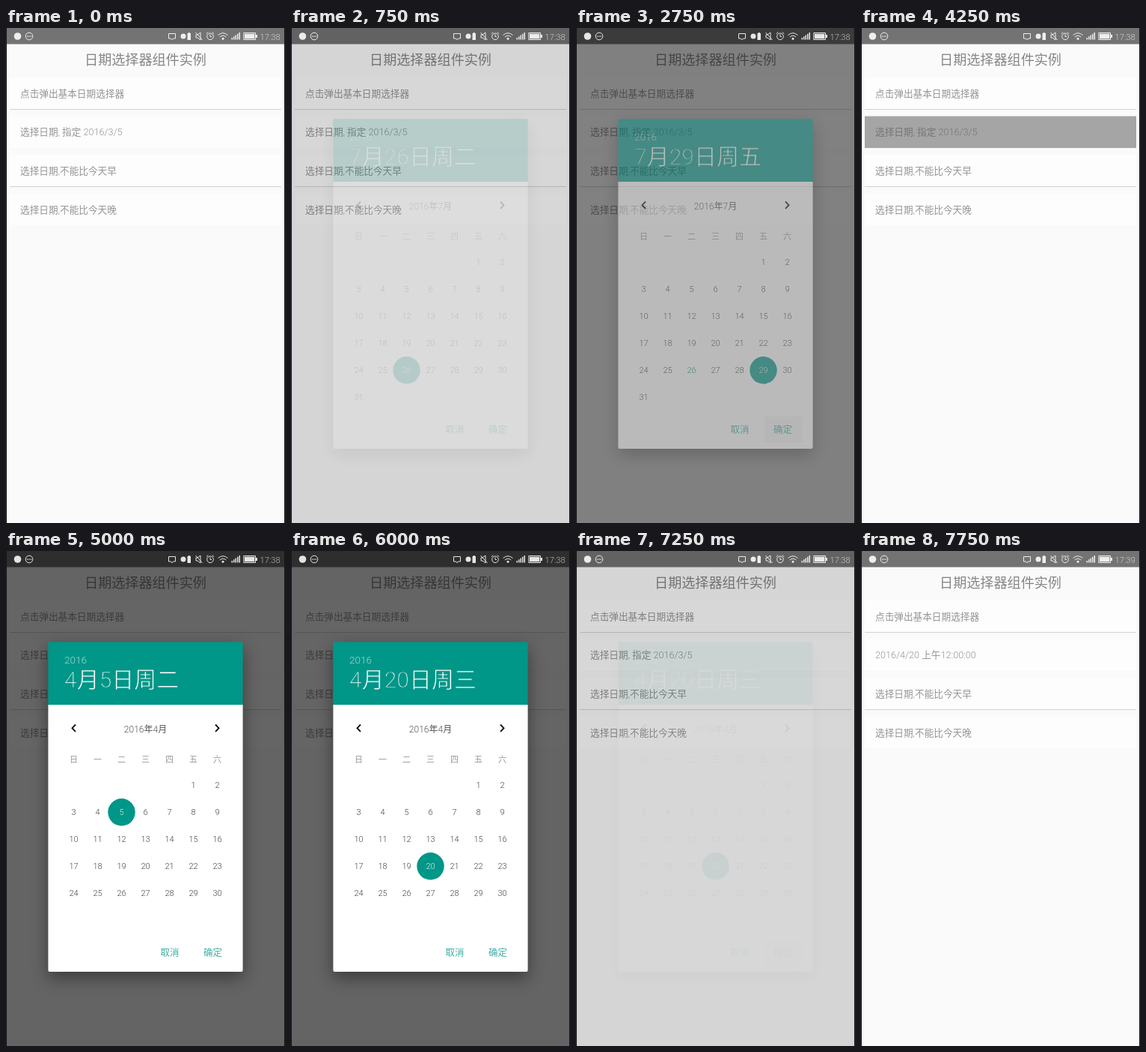
Recreate the animation shown at these times as an HTML page. Size 373 by 660 pixels, loop 8 s.

```html
<!DOCTYPE html>
<html lang="zh-CN">
<head>
<meta charset="utf-8">
<title>日期选择器</title>
<style>
html, body { margin: 0; width: 100%; height: 100%; overflow: hidden; background: #fafafa; }
svg { display: block; width: 373px; height: 660px; }
text { font-family: Roboto, "Noto Sans CJK SC", "Noto Sans CJK", sans-serif; font-weight: 300; }
.mid { text-anchor: middle; }
.line { fill: none; stroke: #fff; stroke-width: 1; }
#card { filter: drop-shadow(0 8px 11px rgba(0, 0, 0, .42)); }
/* An inner edge in the header colour gives hairline strokes. */
#heading { fill: #fff; stroke: #009688; stroke-width: .8; }
</style>
</head>
<body>
<svg id="stage" viewBox="0 0 373 660">
  <defs>
    <linearGradient id="paper" gradientUnits="userSpaceOnUse" x1="0" y1="121" x2="0" y2="561">
      <stop offset=".192" stop-color="#009688"/>
      <stop offset=".192" stop-color="#fff"/>
    </linearGradient>
  </defs>
  <rect width="373" height="660" fill="#fafafa"/>
  <rect width="373" height="21.5" fill="#737373"/>
  <text class="mid" x="186.5" y="48.5" font-size="18.1" fill="#868686">日期选择器组件实例</text>
  <g id="rows" fill="#959595"></g>
  <rect id="dim" width="373" height="660"/>

  <g id="dialog">
    <rect id="card" x="56.4" y="121.3" width="260.2" height="439.7" rx="2" fill="url(#paper)"/>
    <text x="78" y="149.5" font-size="13.6" fill="#fff" fill-opacity=".65">2016</text>
    <text id="heading" x="78" y="182" font-size="30"></text>
    <text id="month" class="mid" x="186.5" y="241.5" font-size="12" fill="#555"></text>
    <path d="M93 231.5l-4.5 4.7 4.5 4.7M280 231.5l4.5 4.7-4.5 4.7" fill="none" stroke="#111" stroke-width="1.9"/>
    <circle id="touch" r="18.2" fill="#e0e0e0"/>
    <circle id="chosen" r="18.2" fill="#009688"/>
    <g id="days" class="mid" font-size="11"></g>
    <rect id="ok" x="252" y="518" width="50" height="35" rx="2" fill-opacity=".03"/>
    <g font-size="12.5" fill="#3fafa4">
      <text x="206.5" y="540">取消</text>
      <text x="264" y="540">确定</text>
    </g>
  </g>

  <g id="status" fill="#fff" opacity=".88">
    <circle cx="15.5" cy="11" r="4.8"/>
    <circle class="line" cx="31" cy="11" r="4.8"/>
    <path d="M28 10.4h1.4v1.3H28zM30.3 10.4h1.4v1.3h-1.4zM32.6 10.4H34v1.3h-1.4z"/>
    <path class="line" d="M217.5 7.5h9v6.5h-3l-1.5 1.8-1.5-1.8h-3z"/>
    <circle cx="237" cy="11" r="3.5"/>
    <path d="M242.5 7h1.2V6h2v1h1.3v9h-4.5z"/>
    <path class="line" d="M254 9h2l4-3v10l-4-3h-2zM253.5 6l9 10"/>
    <circle class="line" cx="273" cy="11.3" r="4.3"/>
    <path class="line" d="M273 8.5v3h2M267.8 7.8l2.5-2.3M278.2 7.8l-2.5-2.3"/>
    <path class="line" d="M283.5 9.5q6.5-5.5 13 0M285.8 12q4.2-3.5 8.4 0"/>
    <circle cx="290" cy="14.3" r="1.5"/>
    <path d="M301.5 13h1.5v2.5h-1.5zM304 11.3h1.5v4.2H304zM306.5 9.5h1.5v6h-1.5zM309 7.7h1.5v7.8H309zM311.5 6h1.5v9.5h-1.5z"/>
    <path class="line" d="M317.8 6.5h15.7v9h-15.7z"/>
    <path d="M319 7.7h13.3v6.6H319zM334 9h2v4h-2z"/>
    <text id="clock" x="339.5" y="15.5" font-size="11.2" fill-opacity=".75"></text>
  </g>
  <path d="M.5 0V660M372.5 0V660" stroke="#161616"/>
</svg>

<script>
const NS = "http://www.w3.org/2000/svg";
const LOOP = 8000;
const $ = id => document.getElementById(id);

function add(parent, tag, attrs, text = "") {
  const el = document.createElementNS(NS, tag);
  set(el, attrs);
  el.textContent = text;
  parent.append(el);
  return el;
}
function set(el, attrs) {
  for (const key in attrs) el.setAttribute(key, attrs[key]);
}
const show = (el, on) => set(el, { visibility: on ? "visible" : "hidden" });

const labels = ["点击弹出基本日期选择器", "选择日期, 指定 2016/3/5", "选择日期,不能比今天早", "选择日期,不能比今天晚"];
const rows = labels.map((label, i) => {
  const y = 66 + i * 51.6;
  const box = add($("rows"), "rect", { x: 5, y, width: 363, height: 42.4 });
  const lined = i % 2 === 0;
  add($("rows"), "path", { d: `M5 ${Math.round(y + 42) + .5}H368`, stroke: lined ? "#d2d2d2" : "#f9f9f9" });
  return { box, text: add($("rows"), "text", { x: 19, y: y + 25.8, "font-size": 12.65 }, label) };
});

// Both months shown begin on a Friday.
const FIRST = 5;
const WEEK = "日一二三四五六";
const column = i => 90.5 + 32 * i;
const place = day => {
  const cell = day + FIRST - 1;
  return { cx: column(cell % 7), cy: 312.3 + 36 * Math.floor(cell / 7) };
};
[...WEEK].forEach((name, i) =>
  add($("days"), "text", { x: column(i), y: 282, fill: "#999" }, name));
const days = Array.from({ length: 31 }, (_, i) => {
  const { cx, cy } = place(i + 1);
  return add($("days"), "text", { x: cx, y: cy + 4 }, i + 1);
});

// Each step keeps the values of the one before it.
const steps = [
  { at: 0, row: -1, dim: 0, fade: 0, month: 7, day: 26, touch: 0, ok: false, done: false, clock: "17:38" },
  { at: 500, row: 0 },
  { at: 750, row: -1, dim: .25, fade: .15 },
  { at: 1000, dim: .8, fade: .65 },
  { at: 1250, dim: 1, fade: .98 },
  { at: 1500, fade: 1 },
  { at: 1750, touch: 29 },
  { at: 2000, touch: 0, day: 29 },
  { at: 2500, ok: true },
  { at: 2750, dim: .82, fade: .46 },
  { at: 3000, dim: 0, fade: 0, ok: false },
  { at: 4250, row: 1, month: 4, day: 5 },
  { at: 4500, row: -1, dim: .45, fade: .35 },
  { at: 4750, dim: .97, fade: .93 },
  { at: 5000, dim: 1, fade: 1 },
  { at: 5750, touch: 20 },
  { at: 6000, touch: 0, day: 20 },
  { at: 6750, ok: true, dim: .92, fade: .69 },
  { at: 7000, dim: .65, fade: .3 },
  { at: 7250, dim: .25, fade: .05 },
  { at: 7500, dim: 0, fade: 0, ok: false, done: true },
  { at: 7750, clock: "17:39" }
];

function draw(time) {
  const s = Object.assign({}, ...steps.filter(step => step.at <= time));

  rows.forEach(({ box, text }, i) => {
    const pressed = i === s.row;
    set(box, { fill: pressed ? "#a5a5a5" : "#fdfdfd" });
    set(text, { fill: pressed ? "#757575" : "#959595" });
  });
  rows[1].text.textContent = s.done ? "2016/4/20 上午12:00:00" : labels[1];

  set($("dim"), { opacity: .6 * s.dim });
  set($("dialog"), { opacity: s.fade });
  $("clock").textContent = s.clock;

  const weekday = WEEK[(s.day + FIRST - 1) % 7];
  $("heading").textContent = `${s.month}月${s.day}日周${weekday}`;
  $("month").textContent = `2016年${s.month}月`;
  set($("chosen"), place(s.day));
  set($("touch"), place(s.touch || 1));
  show($("touch"), s.touch);
  show($("ok"), s.ok);

  const today = s.month === 7 ? 26 : 0;
  days.forEach((el, i) => {
    const day = i + 1;
    set(el, { fill: day === s.day ? "#d8efec" : day === today ? "#009688" : "#444" });
    show(el, day < 31 || s.month === 7);
  });
}

const start = performance.now();
function tick() {
  draw((performance.now() - start) % LOOP);
  requestAnimationFrame(tick);
}
tick();
</script>
</body>
</html>
```
